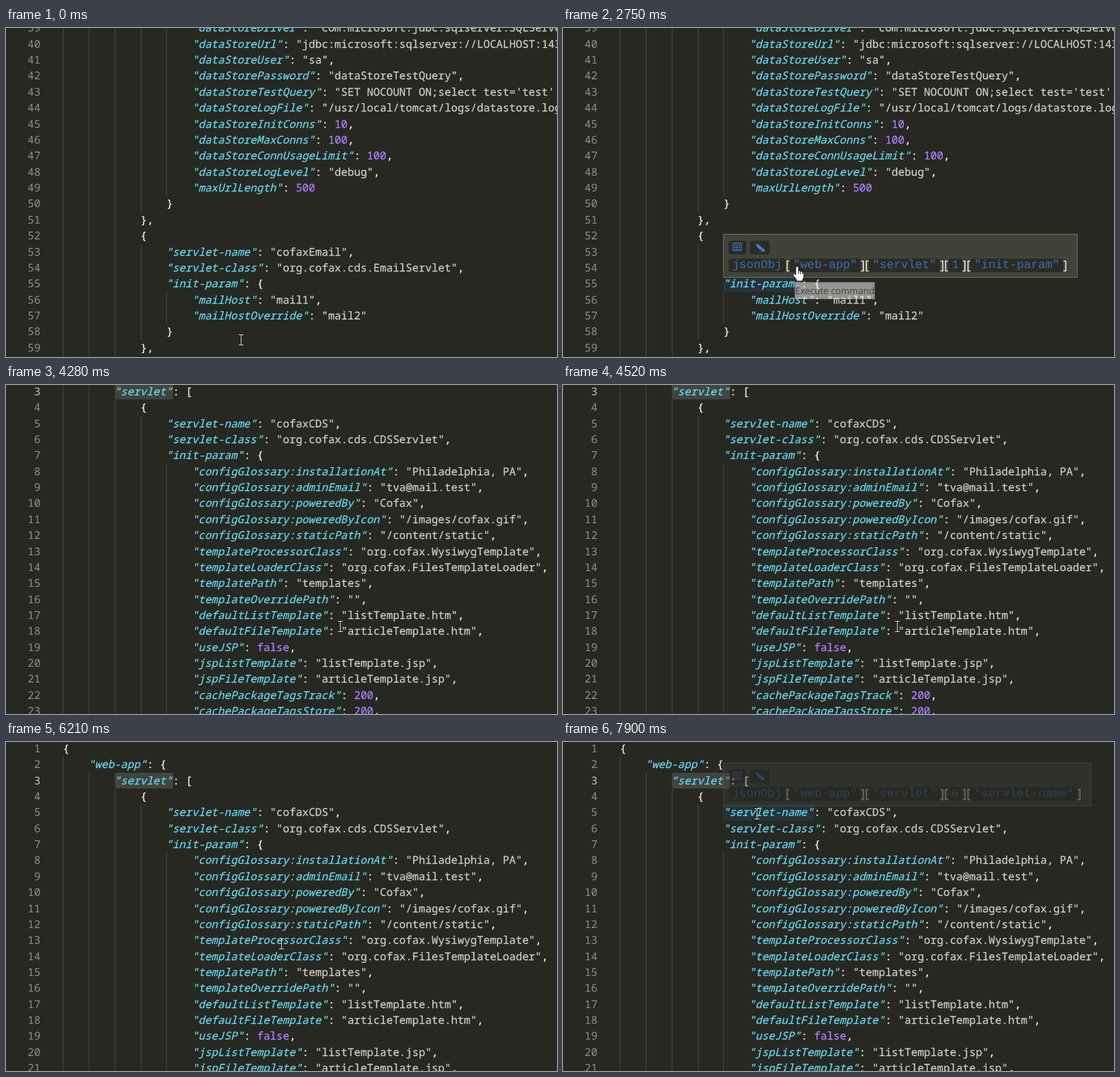
Animation, 805 px wide and 481 px high, one loop 8 s. Source, as an HTML page:

```html
<!DOCTYPE html>
<html lang="en">
<head>
<meta charset="utf-8">
<title>JSON path hover</title>
<style>
html, body { margin: 0; width: 100%; height: 100%; overflow: hidden; background: #272822; }
#stage { position: relative; width: 805px; height: 481px; overflow: hidden; background: #272822; text-rendering: geometricPrecision; }
#doc, #doc div, #doc i, .tip, #title, svg.ptr { position: absolute; }
#doc { left: 0; width: 100%; font: 15.75px/23.37px "Noto Sans Mono", monospace; color: #f8f8f2; }
.line { left: 0; height: 23.37px; width: 100%; white-space: pre; }
#doc i { top: 0; width: 1px; height: 24px; background: #464741; }
.num { left: 0; width: 50.5px; text-align: right; color: #90908a; }
.on .num { color: #c2c2bf; }
.code { left: 83.2px; -webkit-text-stroke: .25px; }
.key { position: relative; left: -.7px; color: #66d9ef; font-style: italic; }
.str { color: #cfcfc2; }
.val { color: #ae81ff; }
.mark { height: 23.37px; border-radius: 3px; background: #42443f; }
.mark.hover { background: rgba(38, 79, 120, .25); border-radius: 0; }
.tip { box-sizing: border-box; padding: 6px 14px 4px 7px; background: #414339; border: 1px solid #75715e; color: #f8f8f2; font: 18px/26px "Open Sans", sans-serif; white-space: pre; }
.row { display: flex; align-items: center; height: 26px; }
.chip { height: 20px; padding: 0 5.2px; border-radius: 4px; background: #2b2c26; color: #3a6fae; font: 17.33px/22px "Liberation Mono", monospace; }
.icon { box-sizing: border-box; width: 26px; margin-right: 5px; }
.icon + .icon { width: 29px; padding-left: 7px; }
.icon svg { display: block; margin-top: 2px; }
#title { box-sizing: border-box; width: 118px; height: 26px; background: #fff; border: 1px solid #767676; color: #575757; font: 13.5px/24px "Open Sans", sans-serif; text-align: center; white-space: nowrap; }
svg.ptr { left: 0; top: 0; overflow: visible; }
</style>
</head>
<body>
<div id="stage">
  <div id="doc"></div>
  <div id="title">Execute command</div>
  <svg class="ptr" id="beam" width="1" height="1"><path d="M-3 -7.5H4M.5 -7.5V7.5M-3 7.5H4" fill="none" stroke="#d8d8d4"/></svg>
  <svg class="ptr" id="hand" width="1" height="1"><path d="M-2 2Q0 -1.5 2 2V7Q4 6 5 8Q7 7 8 9Q10 8.5 10 11V15Q10 18 8 20V22H-1V20L-6 13Q-7 10 -4 11L-2 13Z" fill="#fff" stroke="#111" stroke-linejoin="round"/><path d="M2 7v4M5 8v4M8 9v3" stroke="#111" fill="none"/></svg>
</div>
<script>
const LOOP = 8000, STEP = 130, LINE = 23.37, CHAR = 9.45, LEFT = 83.2, TOP = -2.2;
const CLICK = 4280, WHEEL = 5350;
const $ = id => document.getElementById(id);
const doc = $('doc');

// Each line starts with its indent level.
const head = `0{
1"web-app": {
2"servlet": [
3{
4"servlet-name": "cofaxCDS",
4"servlet-class": "org.cofax.cds.CDSServlet",
4"init-param": {
5"configGlossary:installationAt": "Philadelphia, PA",
5"configGlossary:adminEmail": "tva@mail.test",
5"configGlossary:poweredBy": "Cofax",
5"configGlossary:poweredByIcon": "/images/cofax.gif",
5"configGlossary:staticPath": "/content/static",
5"templateProcessorClass": "org.cofax.WysiwygTemplate",
5"templateLoaderClass": "org.cofax.FilesTemplateLoader",
5"templatePath": "templates",
5"templateOverridePath": "",
5"defaultListTemplate": "listTemplate.htm",
5"defaultFileTemplate": "articleTemplate.htm",
5"useJSP": false,
5"jspListTemplate": "listTemplate.jsp",
5"jspFileTemplate": "articleTemplate.jsp",
5"cachePackageTagsTrack": 200,
5"cachePackageTagsStore": 200,`;
const tail = `5"dataStoreDriver": "com.microsoft.jdbc.sqlserver.SQLServerDriver",
5"dataStoreUrl": "jdbc:microsoft:sqlserver://LOCALHOST:1433;DatabaseName=goon",
5"dataStoreUser": "sa",
5"dataStorePassword": "dataStoreTestQuery",
5"dataStoreTestQuery": "SET NOCOUNT ON;select test='test';",
5"dataStoreLogFile": "/usr/local/tomcat/logs/datastore.log",
5"dataStoreInitConns": 10,
5"dataStoreMaxConns": 100,
5"dataStoreConnUsageLimit": 100,
5"dataStoreLogLevel": "debug",
5"maxUrlLength": 500
4}
3},
3{
4"servlet-name": "cofaxEmail",
4"servlet-class": "org.cofax.cds.EmailServlet",
4"init-param": {
5"mailHost": "mail1",
5"mailHostOverride": "mail2"
4}
3},
3{`;

const lineTop = n => (n - 1) * LINE + TOP;
const indentLeft = level => LEFT + level * 4 * CHAR;

function add(parent, className, html = '') {
  const el = document.createElement('div');
  el.className = className;
  el.innerHTML = html;
  parent.append(el);
  return el;
}

function addMark(line, level, chars, className) {
  const el = add(doc, className);
  el.style.cssText = `left:${indentLeft(level)}px;top:${lineTop(line)}px;width:${chars * CHAR}px`;
  return el;
}

function paint(code) {
  return code.replace(/("[^"]*")(?=:)|("[^"]*")|\d+|false/g, (s, key, str) =>
    `<span class="${key ? 'key' : str ? 'str' : 'val'}">${s}</span>`);
}

function addLines(text, first) {
  return text.split('\n').map((raw, i) => {
    const level = +raw[0];
    let guides = '';
    for (let k = 0; k < level; k++) guides += `<i style="left:${Math.round(indentLeft(k))}px"></i>`;
    const el = add(doc, 'line', `${guides}<div class="num">${first + i}</div>` +
      `<div class="code">${' '.repeat(level * 4)}${paint(raw.slice(1))}</div>`);
    el.style.top = lineTop(first + i) + 'px';
    return el;
  });
}

const chip = s => `<span class="chip">${s}</span>`;
const path = keys => keys.map(k => `<span>[</span>${chip(k)}<span>]</span>`).join('');
const icon = shape => `<span class="chip icon"><svg width="15" height="15" fill="none" stroke="#3f86d8">${shape}</svg></span>`;
const icons = icon('<path d="M1.5 1.5h12v11h-12zM3 4.5h9M3 7.5h9M3 10.5h9"/>') +
  icon('<path d="M4 4.5L10 10.5" stroke-width="4"/><path d="M2 2.5L3.5 4M10.5 12.5l3 .5-1-3z" stroke-width="2"/>');

// Opens above its key, with the bottom edge resting on the key's line.
function addTip(from, to, [line, level, chars], keys, wrapped) {
  const rows = [icons, chip('jsonObj') + path(keys)];
  if (wrapped) rows.push(path([wrapped]));
  const el = add($('stage'), 'tip', rows.map(r => `<div class="row">${r}</div>`).join(''));
  const height = 12 + rows.length * 26;
  const scroll = to <= CLICK ? bottomScroll : 0;
  const x = Math.floor(indentLeft(level));
  const y = Math.round(lineTop(line) - scroll + 2.5) - height;
  el.style.cssText = `left:${x}px;top:${y}px;height:${height}px` + (wrapped ? ';width:560px' : '');
  $('title').before(el);
  return { from, to, el, x, y, height, width: el.offsetWidth, mark: addMark(line, level, chars, 'mark hover') };
}

const bottomScroll = 897.5;
const base = ['"web-app"', '"servlet"'];
const tips = [
  addTip(1190, CLICK, [55, 4, 12], [...base, '1', '"init-param"']),
  addTip(6480, 7500, [13, 5, 24], [...base, '0', '"init-param"'], '"templateProcessorClass"'),
  addTip(7900, LOOP, [5, 4, 14], [...base, '0', '"servlet-name"'])
];
const picked = addMark(3, 2, 9, 'mark');
const current = addLines(head, 1)[2];
addLines(tail, 39);

// Pointer moves: first step, last step, end point.
const moves = [
  [120, 900, 294, 377], [1910, 2190, 342, 348], [3150, 3570, 488, 353],
  [5910, 6210, 402, 295], [7070, 7350, 313, 169], [7500, 7620, 283, 105]
];

function pointerAt(t) {
  let x = 343, y = 456;
  for (const [from, to, endX, endY] of moves) {
    if (t < from) break;
    const steps = Math.round((to - from) / STEP) + 1;
    const p = t >= to ? 1 : Math.min(1, (Math.floor((t - from) / STEP) + 1) / steps);
    const ease = p * (1.4 - .4 * p);
    x += (endX - x) * ease;
    y += (endY - y) * ease;
  }
  return [Math.round(x), Math.round(y)];
}

// The small label fades in below a resting pointer.
const labels = [[2750, 3570], [3880, CLICK]];

const move = (el, x, y) => { el.style.transform = `translate(${x}px,${y}px)`; };

function frame() {
  const t = performance.now() % LOOP;
  const scroll = t < CLICK ? bottomScroll : t < WHEEL ? 2 * LINE : 0;
  doc.style.top = -scroll + 'px';
  picked.style.opacity = t < CLICK ? 0 : 1;
  current.classList.toggle('on', t >= CLICK);

  const [x, y] = pointerAt(t);
  let overTip = false;
  for (const tip of tips) {
    const shown = t >= tip.from && t < tip.to;
    tip.el.style.opacity = !shown ? 0 : t < tip.from + STEP ? .35 : 1;
    tip.mark.style.opacity = shown ? 1 : 0;
    overTip ||= shown && x > tip.x && x < tip.x + tip.width && y > tip.y && y < tip.y + tip.height;
  }

  const label = labels.find(([from, to]) => t >= from && t < to);
  $('title').style.opacity = label ? Math.min(1, (t - label[0] + STEP) / (2 * STEP), (label[1] - t) / (2 * STEP)) : 0;
  if (label) {
    const [restX, restY] = pointerAt(label[0]);
    move($('title'), restX - 4, restY + 23);
  }

  for (const id of ['hand', 'beam']) {
    move($(id), x, y);
    $(id).style.opacity = overTip === (id === 'hand') ? 1 : 0;
  }
  requestAnimationFrame(frame);
}
frame();
</script>
</body>
</html>
```
